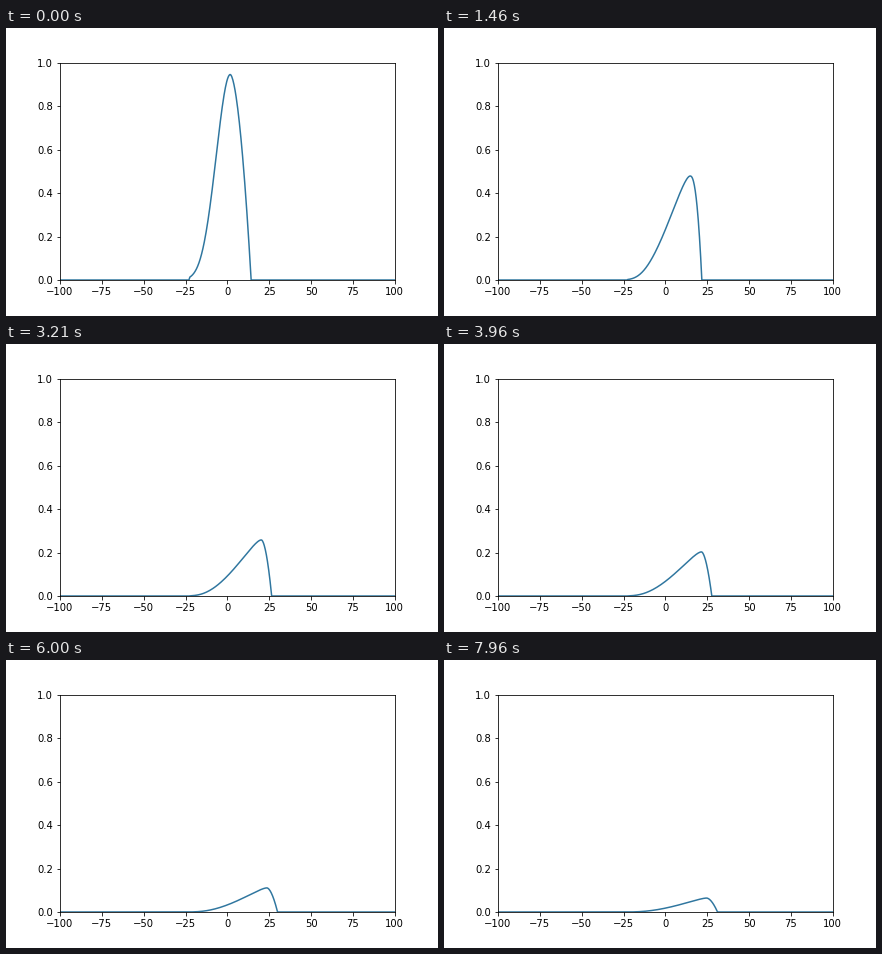
A matplotlib script for the animation above (8 s loop, 432x288 px).

```python
import numpy as np
import matplotlib.pyplot as plt
from matplotlib.animation import FuncAnimation

FRAMES, INTERVAL = 200, 40
LEFT, SIGMA = -22.5, 7.8


def height(t):
    """Crest height: fast loss at first, then a steady decay."""
    return 0.945 * np.exp(-0.23 * t) * (1 + t) ** -0.392


def profile(t):
    a = height(t)
    crest = (1 - a) * (26 + 5 * a)
    front = 32.8 - 26.5 * a + 7.2 * a * a

    # Back: a Gaussian whose taller parts are carried further right
    start = np.linspace(-30, 0, 120)
    bell = np.exp(-start ** 2 / (2 * SIGMA ** 2))
    back_x = start + crest * bell
    back_y = a * bell ** (1.5 - 0.5 * a)
    keep = back_x >= LEFT

    # Face: steepens early, then relaxes
    steep = 1.75 + 3.5 * t * np.exp(-1.5 * t)
    s = np.linspace(0, 1, 40)
    face_x = crest + s * (front - crest)
    face_y = a * (1 - s ** steep)

    x = np.r_[-100, LEFT - 0.5, back_x[keep], face_x, 100]
    y = np.r_[0, 0, back_y[keep], face_y, 0]
    return x, y


plt.rcParams["font.family"] = "DejaVu Sans"
fig, ax = plt.subplots(figsize=(6, 4), dpi=72, facecolor="white")
fig.subplots_adjust(left=0.125, right=0.9, bottom=0.125, top=0.88)
ax.set_xlim(-100, 100)
ax.set_ylim(0, 1)
ax.set_xticks(np.arange(-100, 101, 25))
line, = ax.plot([], [], color="#2f769f", lw=1.5)


def update(i):
    line.set_data(*profile(i * INTERVAL / 1000))
    return line,


anim = FuncAnimation(fig, update, frames=FRAMES, interval=INTERVAL,
                     repeat=True, repeat_delay=0)
plt.show()
```
